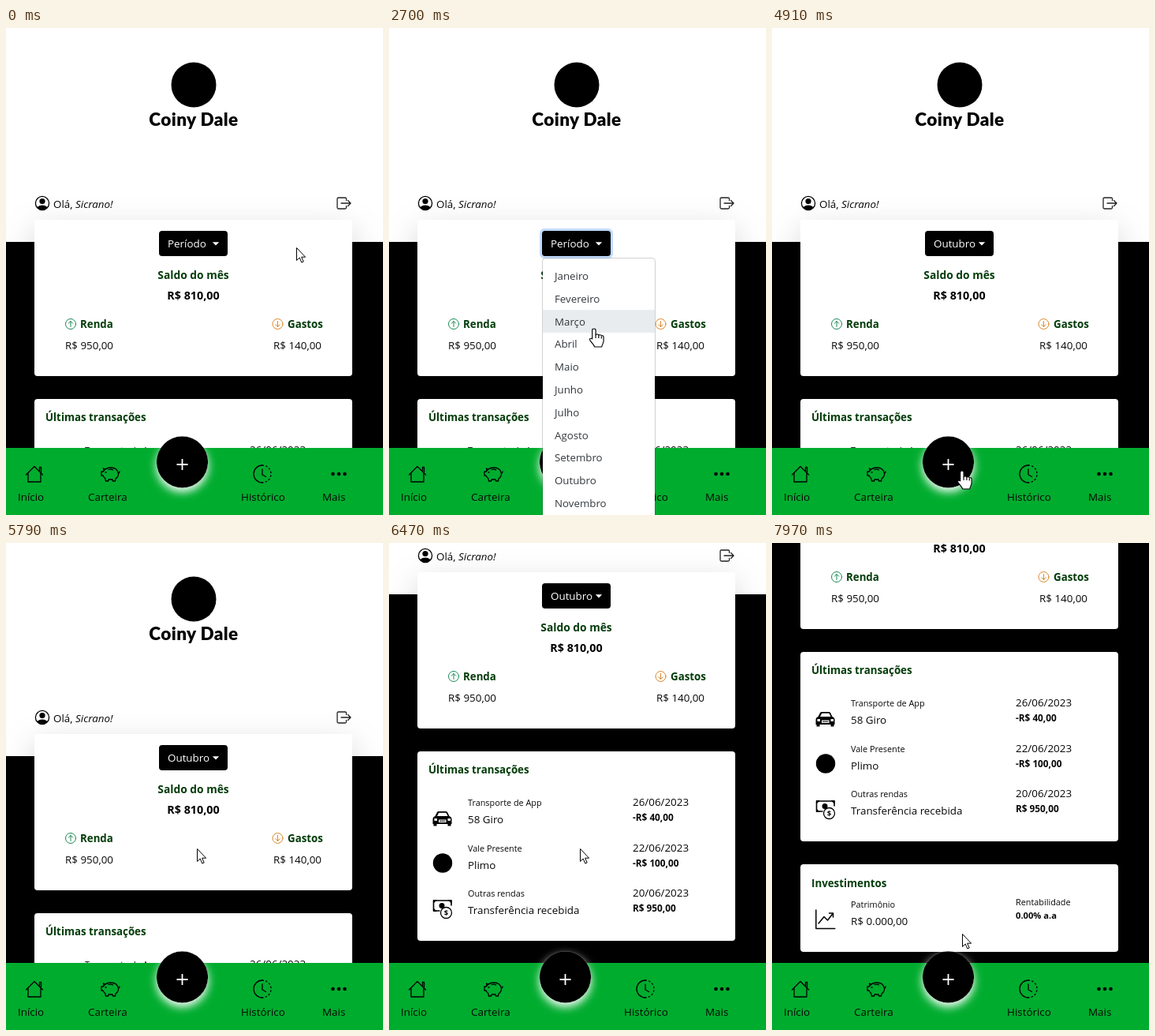
Animation, 478 px wide and 617 px high, one loop 7990 ms. Source, as an HTML page:

```html
<!DOCTYPE html>
<html lang="pt-BR">
<head>
<meta charset="utf-8">
<style>
  html, body { margin: 0; width: 100%; height: 100%; overflow: hidden; background: #fff; }
  svg { display: block; }
  text { font: 13.4px "Open Sans", "Noto Sans", sans-serif; fill: #080808; white-space: pre; }
  .head { font-weight: 700; font-size: 13.3px; fill: #043c0a; }
  .small { font-size: 10.85px; }
  .sum { font-weight: 700; font-size: 11.8px; }
  .line { fill: none; stroke: #000; stroke-width: 1.3; stroke-linecap: round; stroke-linejoin: round; }
  .card { fill: #fff; }
  #menu text { fill: #33383d; font-size: 13.3px; }
  #arrow, #hand { fill: #fff; stroke: #000; stroke-linejoin: round; }
</style>
</head>
<body>
<svg width="478" height="617" viewBox="0 0 478 617">
  <defs>
    <filter id="soft" x="-30%" y="-50%" width="160%" height="220%">
      <feDropShadow dx="0" dy="14" stdDeviation="21" flood-opacity=".175"/>
    </filter>
    <filter id="glow" x="-60%" y="-60%" width="220%" height="220%">
      <feDropShadow dx="0" dy="5" stdDeviation="6" flood-color="#fff"/>
    </filter>
  </defs>

  <g id="page">
    <circle cx="238" cy="72" r="28.5"/>
    <text x="238" y="124" text-anchor="middle" style="font:900 22.5px Lato,sans-serif;letter-spacing:.4px;fill:#000">Coiny Dale</text>

    <rect y="271" width="478" height="700"/>
    <rect class="card" x="36" y="243" width="403" height="198" rx="4" filter="url(#soft)"/>

    <circle class="line" cx="46" cy="222" r="8.6"/>
    <circle cx="46" cy="219.5" r="3.6"/>
    <path d="M39.5 227.5c2-4 11-4 13 0-3.5 4-9.5 4-13 0z"/>
    <text x="60" y="228">Olá, <tspan font-style="italic">Sicrano!</tspan></text>
    <path class="line" style="stroke:#222" d="M431.5 218.5v-2q0-1.5-1.5-1.5h-8.5q-1.5 0-1.5 1.5v11q0 1.5 1.5 1.5h8.5q1.5 0 1.5-1.5v-2M425 222h12m-3.5-3.5 3.5 3.5-3.5 3.5"/>

    <rect id="ring" x="191" y="254" width="93" height="38" rx="6" fill="#c2dbfe"/>
    <rect x="194" y="257" width="87" height="32" rx="4"/>
    <text id="label" x="205" y="278" style="fill:#fff"></text>
    <path d="M261.8 271.3h8.4l-4.2 4.2z" fill="#fff"/>

    <text class="head" x="237.5" y="318" text-anchor="middle" style="font-size:13.8px">Saldo do mês</text>
    <text x="237.5" y="344" text-anchor="middle" style="font-weight:700;font-size:14.3px;fill:#000">R$ 810,00</text>
    <g class="line" style="stroke-width:1">
      <g stroke="#198754"><circle cx="82" cy="375" r="6.5"/><path d="M82 378.5v-7m-2.7 2.7 2.7-2.7 2.7 2.7"/></g>
      <g stroke="#d8892b"><circle cx="344.5" cy="375" r="6.5"/><path d="M344.5 371.5v7m-2.7-2.7 2.7 2.7 2.7-2.7"/></g>
    </g>
    <text class="head" x="94" y="380">Renda</text>
    <text x="75" y="407">R$ 950,00</text>
    <text class="head" x="357" y="380">Gastos</text>
    <text x="339" y="407">R$ 140,00</text>

    <rect class="card" x="36" y="470" width="403" height="240" rx="4"/>
    <text class="head" x="50" y="498">Últimas transações</text>
    <g id="rows"></g>
    <!-- car -->
    <path d="M55.5 556q0-3 3-4l2.5-5q.5-1 2-1h9q1.5 0 2 1l2.5 5q3 1 3 4v6h-1v2.5h-4v-2.5h-14v2.5h-4v-2.5h-1z"/>
    <path d="M61 552l2.2-4.3h9.200l2.200 4.300zM63 556.500h9.500v3.500h-9.500zM57.500 555h3.500v3h-3.500zM74.500 555h3.500v3h-3.500z" fill="#fff"/>
    <path d="M64 558.200h7.500" stroke="#000"/>
    <circle cx="68" cy="611.5" r="12.2"/>
    <!-- banknote and coin -->
    <path class="line" style="stroke-width:1.6" d="M64 672h-7.500v-13h22.500v6"/>
    <path d="M56 658h5l-5 5zM79.5 658h-5l5 5zM56 673h5l-5-5z"/>
    <circle cx="67" cy="665.5" r="3.5"/>
    <circle cx="72.5" cy="674.5" r="7" fill="#fff" stroke="#000" stroke-width="1.3"/>
    <text x="72.5" y="678" text-anchor="middle" style="font-weight:700;font-size:9.5px">$</text>

    <rect class="card" x="36" y="739" width="403" height="111" rx="4"/>
    <text class="head" x="50" y="768">Investimentos</text>
    <path class="line" style="stroke-width:1.5" d="M55.8 797v23.5h24M59 814l7-8.500 4.500 4.500 7-9m-5 0h5v5"/>
    <text class="small" x="100" y="794">Patrimônio</text>
    <text x="100" y="816">R$ 0.000,00</text>
    <text class="small" x="309" y="791">Rentabilidade</text>
    <text class="sum" x="309" y="808" style="font-size:11.2px">0.00% a.a</text>
  </g>

  <rect y="532" width="478" height="85" fill="#00ac2e"/>
  <circle cx="223.5" cy="550" r="32.7" filter="url(#glow)"/>
  <path d="M216.5 553h14M223.5 546v14" stroke="#fff" stroke-width="1.8"/>
  <g class="line">
    <path d="M25.5 566l10.5-10.5 10.5 10.5M28 564v11h16v-11M42.500 561v-4.500h2v6.500"/>
    <path d="M124 561q3-4 9-4 8 0 9.500 7 .5 4-3.500 7l-.5 3h-3l-.5-2h-5l-.5 2h-3l-.8-3.500q-2-1.500-2.700-3.500h-2v-5h2zl-.5-3 2.500 1M130 559.500q3-1 5.500.3M142.500 564q1.500 0 1.500-2"/>
    <circle cx="126.5" cy="563" r=".4"/>
    <path d="M325 554a11 11 0 1 0 0 22M325 559v7l4.500 2.500"/>
    <path d="M325 554a11 11 0 0 1 0 22" stroke-dasharray="1.5 3.26"/>
  </g>
  <circle cx="414.5" cy="565" r="2.3"/><circle cx="422" cy="565" r="2.3"/><circle cx="429.5" cy="565" r="2.3"/>
  <text x="15" y="599">Início</text>
  <text x="104" y="599">Carteira</text>
  <text x="298" y="599">Histórico</text>
  <text x="401" y="599">Mais</text>

  <g id="menu">
    <rect x="195" y="292" width="142" height="360" rx="3.5" fill="#fff"/>
    <rect x="194.5" y="291.5" width="143" height="361" rx="4" fill="none" stroke="#000" stroke-opacity=".18"/>
    <rect id="hover" x="195" width="142" height="28.8" fill="#e9ecef"/>
  </g>

  <path id="arrow" d="M.5.5v16l3.700-3.500 2.600 6 2.400-1-2.600-5.800h5z"/>
  <g id="hand">
    <g transform="scale(1.15 1)">
      <path d="M-2 13V2a1.900 1.900 0 0 1 3.800 0v6c.3-1.500 3.300-1.300 3.300.5.400-1.300 3-1 3 .8.400-1.200 2.400-.6 2.400 1.200v5c0 3-1.700 4-2 7.500h-8c-.5-3-3-4.500-5-8.500-1-2 1-3 2.500-1.500z"/>
      <path d="M1.800 8v4M5.100 9v3M8.100 10v2.500" fill="none"/>
    </g>
  </g>
</svg>
<script>
const LOOP = 7990, MENU_OPEN = 2030, MENU_CLOSE = 4200, ITEM_TOP = 299.6, ITEM_H = 28.8;
const MONTHS = ['Janeiro', 'Fevereiro', 'Março', 'Abril', 'Maio', 'Junho', 'Julho',
  'Agosto', 'Setembro', 'Outubro', 'Novembro', 'Dezembro'];
const ROWS = [
  ['Transporte de App', '58 Giro', '26/06/2023', '-R$ 40,00'],
  ['Vale Presente', 'Plimo', '22/06/2023', '-R$ 100,00'],
  ['Outras rendas', 'Transferência recebida', '20/06/2023', 'R$ 950,00']
];
// [time, x, y] of the pointer's hot spot
const POINTER = [[0, 368, 278], [560, 368, 278], [770, 299, 267], [890, 299, 267], [910, 297, 267],
  [1100, 297, 267], [1770, 211, 269], [2430, 211, 269], [2700, 260, 381], [3200, 255, 490],
  [3990, 243, 578], [4670, 241, 578], [4840, 241, 578], [5610, 242, 390], [5660, 242, 387],
  [7640, 242, 387], [7970, 241, 495], [LOOP, 241, 495]];
const SCROLL = [[0, 0], [5778, 0], [6080, 206], [6465, 206], [6650, 303], [7305, 303], [7460, 332], [LOOP, 332]];

const $ = id => document.getElementById(id);
const clamp = v => Math.max(0, Math.min(1, v));
const smooth = u => u * u * (3 - 2 * u);
const show = (el, on) => el.setAttribute('visibility', on ? 'visible' : 'hidden');
const text = (x, y, str, cls = '') => `<text class="${cls}" x="${x}" y="${y}">${str}</text>`;

function sample(keys, t, ease = u => u) {
  const i = Math.max(1, keys.findIndex(k => k[0] > t));
  const [a, b] = [keys[i - 1], keys[i]];
  const u = ease((t - a[0]) / (b[0] - a[0]));
  return a.slice(1).map((v, j) => Math.round(v + (b[j + 1] - v) * u));
}

$('menu').insertAdjacentHTML('beforeend',
  MONTHS.map((m, i) => text(210, Math.round(ITEM_TOP + 19.4 + i * ITEM_H), m)).join(''));
$('rows').innerHTML = ROWS.map(([kind, name, date, sum], i) => {
  const y = Math.round(539 + i * 57.5);
  return text(100, y, kind, 'small') + text(100, y + 22, name) +
    text(309, y, date) + text(309, y + 19, sum, 'sum');
}).join('');

function draw(now) {
  const t = now % LOOP;
  const [x, y] = sample(POINTER, t);
  const [scroll] = sample(SCROLL, t, smooth);
  const open = t >= MENU_OPEN && t < MENU_CLOSE;
  const item = Math.floor((y - ITEM_TOP) / ITEM_H);
  const onButton = scroll === 0 && x > 194 && x < 281 && y > 257 && y < 289;
  const onPlus = Math.hypot(x - 223.5, y - 550) < 32.7;
  const pointing = open || onButton || onPlus;

  $('page').setAttribute('transform', `translate(0 ${-scroll})`);
  $('ring').setAttribute('opacity', clamp((t - 1950) / 150) * (1 - clamp((t - MENU_CLOSE) / 150)));
  $('label').textContent = t < MENU_CLOSE ? 'Período' : 'Outubro';
  show($('menu'), open);
  show($('hover'), open && item >= 0);
  $('hover').setAttribute('y', ITEM_TOP + Math.max(0, item) * ITEM_H);
  show($('arrow'), !pointing);
  show($('hand'), pointing);
  for (const id of ['arrow', 'hand']) $(id).setAttribute('transform', `translate(${x} ${y})`);
  requestAnimationFrame(draw);
}
requestAnimationFrame(draw);
</script>
</body>
</html>
```
